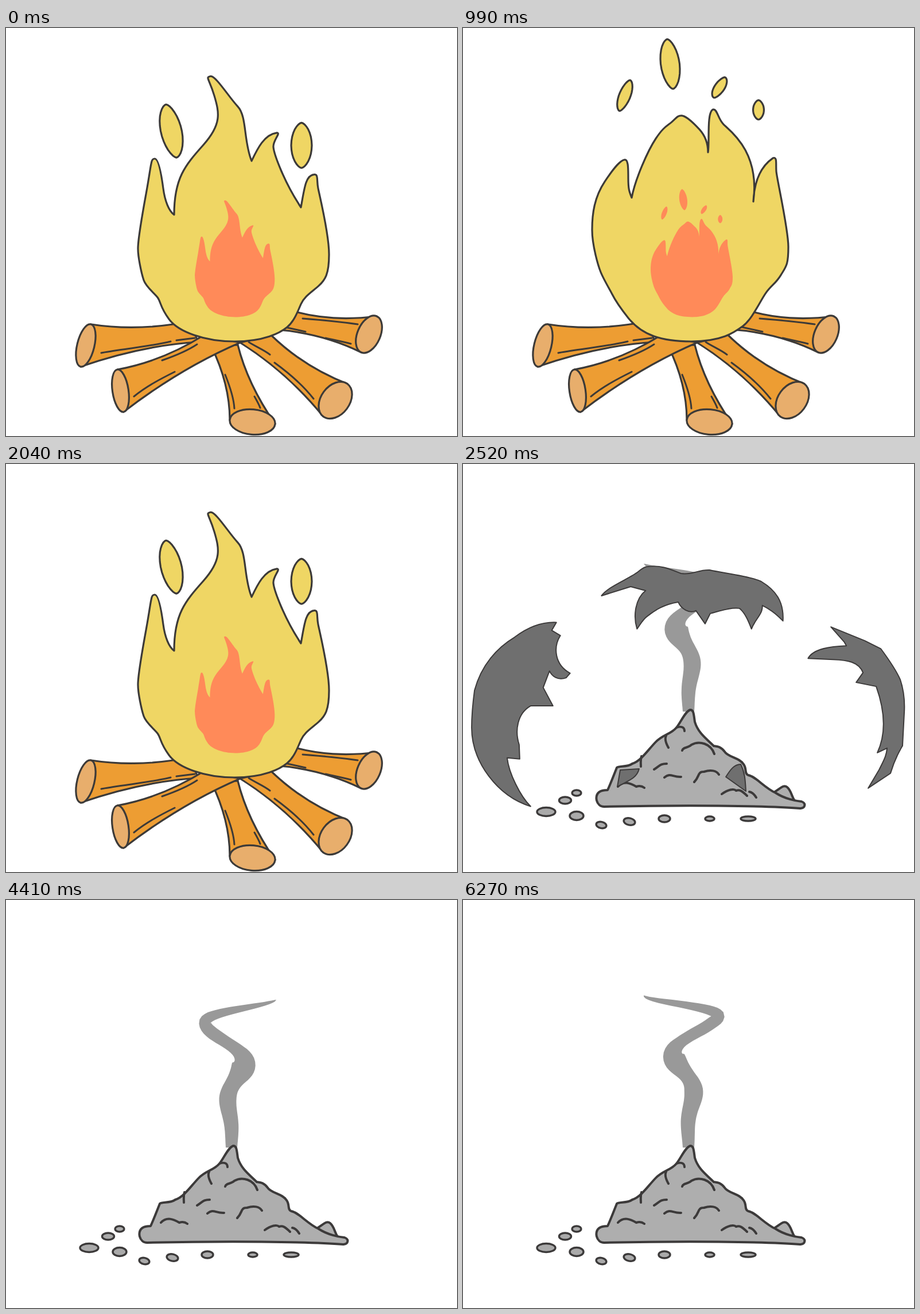
An HTML page that plays this animation: 786x712 px, repeating every 6.3 s.

```html
<!DOCTYPE html>
<html lang="en">
<head>
<meta charset="utf-8">
<title>Campfire</title>
<style>
html, body { margin: 0; width: 100%; height: 100%; overflow: hidden; background: #fff; }
svg { display: block; width: 100%; height: 100%; }
path, ellipse { stroke-linejoin: round; stroke-linecap: round; }
#logs, #flame, #sparks { stroke: #3c3a38; stroke-width: 3.2; }
#logs path { fill: #ed9d33; }
#logs ellipse { fill: #e8ae6c; }
#grain { fill: none; stroke: #3c3a38; stroke-width: 3; }
#flame, #sparks { fill: #efd664; }
#inner, #embers { fill: #ff8a59; }
#smoke { fill: #999; }
#pile path, #pile ellipse { fill: #aeaeae; stroke: #3c3a3a; stroke-width: 4; }
#pile .crack { fill: none; }
#pile ellipse { stroke-width: 3.4; fill: #aaa; }
#burst path, #cloud { fill: #6f6f6f; stroke: #3c3a3a; stroke-width: 2; }
</style>
</head>
<body>
<svg viewBox="0 0 786 712" preserveAspectRatio="none">
  <g id="fire">
    <g id="logs"></g>
    <path id="grain" d="M166 567C190 562 250 556 287 547M297 545L329 541M517 507C555 510 585 513 613 517M486 522L522 530M557 541C575 545 590 548 601 551M382 605C390 625 397 645 398 664M433 643C437 650 441 657 443 663M423 548C435 556 450 562 460 570M468 584C490 600 515 620 536 647M272 580C295 572 315 564 333 552M223 643C245 625 270 612 294 600"/>
    <path id="sparks"/>
    <path id="flame"/>
    <path id="embers"/>
    <path id="inner"/>
  </g>
  <g id="ash">
    <path id="smoke"/>
    <g id="pile">
      <path d="M540 574C552 568 558 558 565 564C572 570 572 578 578 588"/>
      <path d="M246 598C232 598 228 578 238 572C243 569 250 569 252 569C258 556 262 545 268 530C272 526 285 530 295 523C310 518 320 502 335 486C348 472 362 472 372 460C380 450 387 432 396 429C402 429 402 436 404 450C410 470 425 480 437 492C445 493 450 494 456 502C462 512 482 512 489 524C495 532 490 540 497 543C510 545 525 565 545 574C560 584 580 588 590 589C598 592 597 600 588 601C530 596 380 595 246 598Z"/>
      <path class="crack" d="M372 460C380 457 386 459 386 466M354 474C351 480 354 488 358 495M382 500C383 494 392 496 398 490C412 482 432 488 438 506M311 510C309 517 310 522 310 528M333 533C343 527 343 523 355 523M351 547C362 538 365 547 380 546"/>
      <path class="crack" d="M403 555C413 545 408 537 420 537C432 533 442 535 446 542M270 563C280 552 292 557 302 563C308 561 312 562 316 565M451 576C462 568 472 566 476 570C482 568 486 570 495 579M499 572C505 573 508 577 511 582"/>
      <ellipse cx="145" cy="607" rx="16" ry="7.5"/>
      <ellipse cx="178" cy="587" rx="10.5" ry="6"/>
      <ellipse cx="198" cy="574" rx="8" ry="5"/>
      <ellipse cx="198" cy="614" rx="12" ry="7.5"/>
      <ellipse cx="241" cy="630" rx="9" ry="5.5" transform="rotate(12 241 630)"/>
      <ellipse cx="290" cy="624" rx="10" ry="6" transform="rotate(12 290 624)"/>
      <ellipse cx="351" cy="619" rx="10" ry="6"/>
      <ellipse cx="430" cy="619" rx="8" ry="4"/>
      <ellipse cx="497" cy="619" rx="13" ry="4"/>
    </g>
    <g id="burst">
      <path data-c="400 228" data-v="0 -26" d="M241 230C252 214 290 200 305 188C312 182 318 179 322 179C345 176 360 183 380 191C400 194 410 184 430 185C450 190 500 195 520 205C545 220 560 240 558 274C550 266 540 256 522 247C523 262 510 270 503 288C498 275 492 260 482 252C468 250 450 256 431 261L422 279L406 256C395 262 380 253 375 241C350 245 335 255 322 265C312 272 308 282 303 288C296 265 300 235 318 221L292 214Z"/>
      <path data-c="85 430" data-v="-40 0" d="M163 276L155 290L170 299C157 320 160 350 187 365L180 373C165 378 155 370 151 361L140 390L157 422L118 422C95 435 90 465 98 490L99 515L77 513C80 540 100 580 118 598C60 580 15 520 15 460C15 435 18 410 20 395C32 350 60 320 90 302C115 283 140 275 163 276Z"/>
      <path data-c="715 430" data-v="40 0" d="M641 284L700 308L728 322C745 345 755 360 762 376C770 400 770 420 769 435L766 492C755 510 748 530 745 540L706 566L725 534C732 520 738 510 739 496L722 504C738 470 735 430 720 388L685 381L697 364C690 345 670 342 645 341L601 339C610 322 640 318 668 317L664 310Z"/>
      <path data-c="288 547" data-v="-10 0" d="M274 534L307 532C303 548 290 552 269 563Z"/>
      <path data-c="478 547" data-v="10 0" d="M458 546C465 535 472 524 484 524C492 540 492 555 493 571Z"/>
    </g>
  </g>
  <path id="cloud" fill-rule="evenodd"/>
</svg>
<script>
const LOOP = 6300, BEAT = 680, PEAK = 310, SWAY = 1200;
const { PI, sin, cos, abs, min, max } = Math;
const $ = id => document.getElementById(id);
const clamp = v => max(0, min(1, v));
const mix = (a, b, k) => a + (b - a) * k;
const setPath = (id, d) => $(id).setAttribute('d', d);
const poly = list => 'M' + list.map(p => p.map(v => v.toFixed(1))).join('L') + 'Z';
const range = (n, f) => Array.from({ length: n }, (_, i) => f(i));

// Two edges bowed inwards from the hub to an oval cut
function log([ax, ay], [bx, by], [ex, ey], [fx, fy], thick) {
  const cx = (ex + fx) / 2, cy = (ey + fy) / 2;
  const len = Math.hypot(fx - ex, fy - ey), pull = 16 / len;
  const ux = (fx - ex) * pull, uy = (fy - ey) * pull;
  const turn = Math.atan2(fy - ey, fx - ex) * 180 / PI;
  $('logs').innerHTML +=
    `<path d="M${ax} ${ay}Q${(ax + ex) / 2 + ux} ${(ay + ey) / 2 + uy} ${ex} ${ey}L${fx} ${fy}` +
    `Q${(bx + fx) / 2 - ux} ${(by + fy) / 2 - uy} ${bx} ${by}Z"/>` +
    `<ellipse rx="${len / 2}" ry="${thick}" transform="translate(${cx} ${cy}) rotate(${turn})"/>`;
}
log([320, 512], [335, 548], [148, 517], [130, 591], 15);
log([500, 494], [465, 526], [646, 503], [619, 566], 20);
log([358, 556], [404, 553], [390, 684], [469, 691], 22);
log([408, 549], [462, 536], [553, 678], [595, 621], 25);
log([345, 536], [408, 549], [194, 596], [205, 670], 14);

// The two extreme poses share one path structure
const tall = 'M293 326C293 262 312 240 344 204S372 148 363 118S347 86 356 84S388 120 404 137S414 198 428 232' +
  'C438 211 450 186 472 183C480 183 465 196 466 208S484 268 514 313' +
  'C520 280 522 258 536 256C545 254 541 265 544 280S563 360 563 395S556 440 545 450S520 468 514 482S502 512 490 522' +
  'S450 547 398 547S300 530 284 508S270 478 264 470S244 452 240 440S230 400 230 385S234 345 244 290S252 228 259 228S271 258 274 280S284 320 293 326Z';
const wide = 'M294 296C300 264 322 214 336 193S356 171 364 164S374 153 381 153S402 166 412 177S427 200 427 217' +
  'C430 200 424 146 436 142C443 141 444 158 454 168S518 215 506 303' +
  'C508 258 524 238 540 227C548 224 545 236 546 250S567 350 567 382S563 416 554 431S538 448 528 462S504 508 488 520' +
  'S450 547 398 547S312 536 288 506S262 468 257 459S244 436 240 426S225 380 225 352S229 295 247 268S274 232 281 230S288 242 288 262S290 286 294 296Z';

function morph(a, b, k) {
  const goal = b.match(/\d+/g);
  let i = 0;
  return a.replace(/\d+/g, v => mix(+v, +goal[i++], k).toFixed(1));
}

// Leaning drop with narrow ends: centre, width, height, lean
const drop = ([x, y, w, h, lean]) => poly(range(32, i => {
  const a = i / 32 * 2 * PI;
  return [x - lean * cos(a) + w / 2 * sin(a) * abs(sin(a)) ** .25, y - h / 2 * cos(a)];
}));

// Every step of a track lasts one half of the beat
const tracks = [
  { rising: false, keys: [[268, 275, 10, 28, 2], [288, 180, 37, 93, 9], [282, 118, 21, 54, -9], [284, 60, 0, 0, 0]] },
  { rising: false, keys: [[538, 285, 10, 24, 0], [515, 205, 36, 79, 0], [515, 143, 19, 34, 0], [515, 95, 0, 0, 0]] },
  { rising: true, keys: [[378, 170, 12, 30, 1], [361, 63, 33, 87, 5], [361, 4, 0, 0, 0]] },
  { rising: true, keys: [[455, 215, 9, 18, -5], [447, 104, 20, 36, -9], [440, 50, 0, 0, 0]] }
];

function drawFire(t) {
  const ph = t % BEAT, up = ph < PEAK;
  const k = up ? ph / PEAK : (ph - PEAK) / (BEAT - PEAK);
  const w = up ? k : 1 - k;
  const body = morph(tall, wide, w);
  let drops = '';
  for (const { rising, keys } of tracks)
    for (let i = rising === up ? 0 : 1; i < keys.length - 1; i += 2)
      drops += drop(keys[i].map((v, j) => mix(v, keys[i + 1][j], k)));

  const sy = mix(.44, .423, w);
  const core = `matrix(.418 0 0 ${sy} 233 ${504 - 546 * sy})`;
  setPath('flame', body);
  setPath('inner', body);
  setPath('sparks', drops);
  setPath('embers', w > .3 ? drops : '');
  $('inner').setAttribute('transform', core);
  $('embers').setAttribute('transform', core);
}

// A wave that climbs and swings wider with height v
function drawSmoke(t) {
  const ph = (t - 3210 + 10 * SWAY) % SWAY, half = ph % (SWAY / 2);
  const p = half < 60 ? .22 * half / 60 : mix(.22, 1, clamp((half - 60) / 450));
  const side = ph < SWAY / 2 ? 1 : -1;
  const tip = 4 + min(p, (1 - p) / 3.5);
  const spine = v => [
    393 + side * 5.6 * min(v, 4) ** 1.9 * cos(PI * (v - p)),
    v < 3 ? 432 - 71 * v : 219 - 45 * (v - 3) ** .8
  ];
  const left = [], right = [];
  for (const v of range(81, i => tip * i / 80)) {
    const [x, y] = spine(v), [x0, y0] = spine(max(0, v - .03)), [x1, y1] = spine(v + .03);
    const len = Math.hypot(x1 - x0, y1 - y0);
    const swell = 16 * Math.exp(-2.5 * (v - 2) ** 2) * cos(PI * (v - p)) ** 2;
    const r = (20 + 8 * max(0, sin(PI * v / 2.6)) + swell) / 2 * min(1, 1.1 * (tip - v)) ** .7;
    const nx = (y1 - y0) / len * r, ny = (x0 - x1) / len * r;
    left.push([x + nx, y + ny]);
    right.unshift([x - nx, y - ny]);
  }
  setPath('smoke', poly([...left, ...right]));
}

const jagged = (rx, ry, n) => poly(range(n, i => {
  const a = i / n * 2 * PI, r = i % 2 ? .9 : 1;
  return [393 + cos(a) * rx * r, 400 + sin(a) * ry * r];
}));

function drawCloud(t) {
  let d = '';
  if (t > 2070 && t < 2480) {
    const grow = sin(clamp((t - 2060) / 180) * PI / 2);
    const hole = clamp((t - 2290) / 190);
    d = jagged(390 * grow, (330 - 100 * hole) * grow, 40);
    if (hole) d += jagged(300 * hole, 170 * hole, 26);
  }
  setPath('cloud', d);
  const k = clamp((t - 2520) / 400);
  $('burst').style.display = t >= 2480 && k < 1 ? '' : 'none';
  for (const p of $('burst').children) {
    const [cx, cy] = p.dataset.c.split(' ').map(Number);
    const [vx, vy] = p.dataset.v.split(' ').map(Number);
    p.setAttribute('transform', `translate(${cx + vx * k} ${cy + vy * k}) scale(${1 - k}) translate(${-cx} ${-cy})`);
  }
}

function draw(now) {
  const t = now % LOOP, burning = t < 2230;
  $('fire').style.display = burning ? '' : 'none';
  $('ash').style.display = burning ? 'none' : '';
  if (burning) drawFire(t); else drawSmoke(t);
  drawCloud(t);
}

const start = performance.now();
(function tick() {
  draw(performance.now() - start);
  requestAnimationFrame(tick);
})();
</script>
</body>
</html>
```
